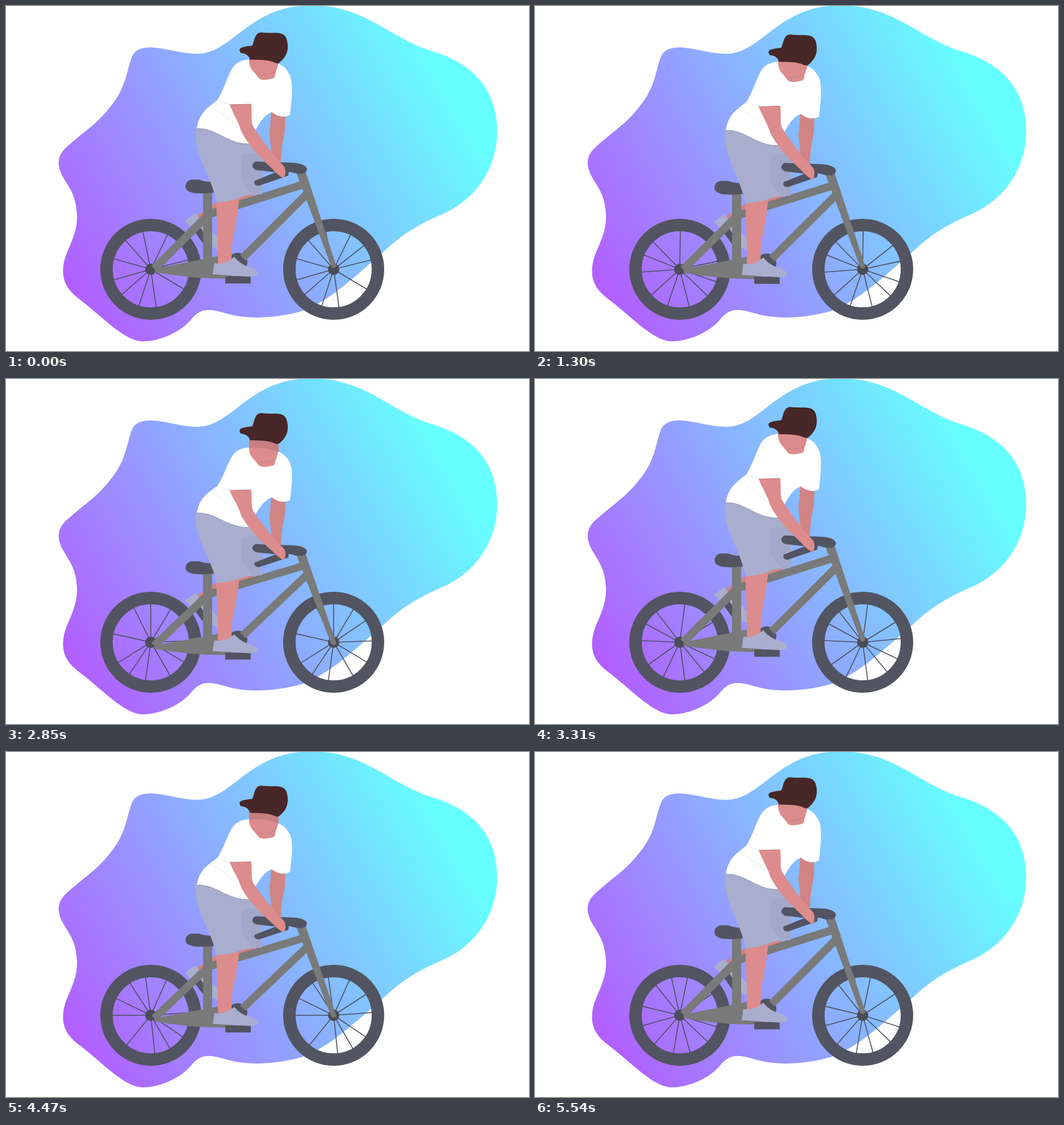
Write an HTML page that moves like this. It is 921 px wide and 608 px high and loops after 5620 ms.

```html
<!DOCTYPE html>
<html lang="en">
<head>
<meta charset="utf-8">
<title>Cyclist</title>
<style>
  html, body { margin: 0; width: 100%; height: 100%; overflow: hidden; background: #fefefe; }
  svg { display: block; width: 921px; height: 608px; }
  .dark { fill: #525461; }
  .metal { fill: #797a79; }
  .skin { fill: #dc8c8c; }
  .shade { fill: #d08483; }
  .cloth { fill: #a9aece; }
  .line { fill: none; stroke-linecap: round; }
  .tube { fill: none; stroke: #797a79; }
</style>
</head>
<body>
<svg viewBox="0 0 921 608">
  <defs>
    <linearGradient id="sky" gradientUnits="userSpaceOnUse" x1="130" y1="530" x2="790" y2="150">
      <stop offset="0" stop-color="#b25eff"/>
      <stop offset="1" stop-color="#66ffff"/>
    </linearGradient>
  </defs>

  <path fill="url(#sky)" d="M222 89C228 76 240 73 256 73C285 74 313 86 342 84C400 80 430 0 535 -1C630 -2 670 52 745 78C815 98 865 140 865 222C864 286 828 341 768 367C700 396 680 420 655 442C610 480 570 520 520 538C470 552 420 552 385 541C355 532 342 534 328 550C310 574 270 592 238 591C208 588 175 553 135 521C112 504 92 486 104 444C112 420 126 400 125 368C123 330 110 320 98 297C88 275 92 260 112 244C145 215 165 205 193 165C212 138 214 108 222 89Z"/>

  <g id="wheels"></g>

  <g id="body">
    <!-- far leg -->
    <path class="dark" d="M326 389L340 383L364 420L354 428Z"/>
    <path class="cloth" d="M315 379L333 365L374 409V430L362 423L338 383L325 389Z"/>
    <path class="shade" d="M337 369L366 349L437 329L434 338L372 361L342 378Z"/>

    <!-- frame -->
    <circle class="dark" cx="408" cy="452" r="17"/>
    <path class="metal" d="M262 463L372 441L412 452L396 480Q335 482 262 469Z"/>
    <path class="tube" stroke-width="14" d="M261 463L360 364M357 367L525 314M417 444L531 330"/>
    <path class="metal" d="M347 328H363V444L347 447ZM511 293L527 290L582 459Q577 464 573 460Z"/>
    <path class="dark" d="M326 306H340Q355 312 374 309L371 328Q345 332 328 329Q316 326 316 318Q317 308 326 306Z"/>

    <!-- near leg -->
    <path class="dark" d="M386 476H431V489H386Z"/>
    <path class="skin" d="M370 340L411 336C408 370 402 395 398 420L397 452Q385 458 373 454C374 420 372 390 370 340Z"/>
    <path class="cloth" d="M367 453Q385 457 402 442Q412 455 428 460Q444 465 444 472Q443 477 430 477Q395 475 364 473Z"/>
    <path class="cloth" d="M336 212C334 218 334 222 334 225C335 270 358 290 371 346Q395 345 411 338Q430 331 450 332L452 262L430 238Z"/>
    <path fill="#a2a8c9" d="M415 263Q425 258 452 260L450 331Q440 334 434 330Q412 312 414 285Z"/>

    <!-- bars and far arm -->
    <path class="shade" d="M467 185Q480 193 492 192C492 215 490 230 487 240C485 255 484 268 484 280L468 268C467 240 462 225 465 215Z"/>
    <path class="dark" d="M439 274L500 276C515 276 530 280 530 288C528 296 520 297 510 295L498 292L497 299L445 317Q435 316 438 308L475 293L440 289Q428 282 439 274Z"/>

    <!-- shirt -->
    <path fill="#fff" d="M430 94C412 95 404 101 397 112C388 130 380 155 372 166C352 181 340 190 336 216C370 214 388 244 429 243C437 222 450 193 468 187Q485 200 500 192C503 170 506 140 501 125C496 113 490 106 480 102Z"/>
    <path class="line" stroke="#8f94b5" d="M336 216C370 214 388 244 429 243"/>
    <path class="line" stroke="#e6e6ec" d="M359 177C382 188 396 205 408 214M373 166Q385 172 394 173"/>

    <!-- near arm -->
    <path class="skin" d="M394 174L432 173C434 190 430 205 437 215C450 235 470 262 490 283Q495 294 489 304Q477 297 469 287C445 265 425 243 414 220C410 205 400 190 394 174Z"/>
    <path class="line" stroke="#b87272" d="M394 174L431 173"/>

    <!-- face -->
    <path class="skin" d="M428 76H480V95C480 105 476 112 474 121Q474 127 469 128L458 130Q449 131 445 127L438 118C432 112 428 106 428 94Z"/>
    <path fill="#c77f80" d="M428 76H480V102Q474 101 468 98Q450 92 428 96Z"/>
    <path class="line" stroke="#cb7f80" d="M441 119Q460 126 475 114"/>
  </g>

  <path id="cap" fill="#482728" d="M411 78C413 71 428 72 434 70C438 60 438 47 450 47C470 50 488 43 494 58C499 74 496 88 483 99Q479 104 470 99C455 94 440 96 430 95C427 86 420 84 413 83Z"/>
</svg>

<script>
const LOOP = 5620, STEPS = 73, TURN = 1965;
const FLOOR_Y = 595;
const SPOKES = [0, 51, 77, 108, 133, 165, 198, 227, 265, 291, 315];
const SVG = "http://www.w3.org/2000/svg";
const $ = id => document.getElementById(id);

function add(parent, tag, attrs) {
  const el = parent.appendChild(document.createElementNS(SVG, tag));
  for (const key in attrs) el.setAttribute(key, attrs[key]);
  return el;
}

function makeWheel(x, y) {
  const wheel = add($("wheels"), "g", { transform: `translate(${x} ${y})` });
  add(wheel, "circle", { r: 78, fill: "none", stroke: "#525461", "stroke-width": 22 });
  const spokes = add(wheel, "g", { stroke: "#4d4f5b", "stroke-width": 1.6 });
  for (const a of SPOKES) add(spokes, "line", { x2: 68, transform: `rotate(${a})` });
  add(wheel, "circle", { r: 10, fill: "#4b4c57" });
  return spokes;
}

const wheels = [makeWheel(255, 464), makeWheel(577, 464)];

function draw(t) {
  const wave = Math.cos((t - 735) / TURN * 2 * Math.PI);
  const squash = 0.061 * ((1 + wave) / 2) ** 1.8 - 0.002;
  $("body").setAttribute("transform", `translate(0 ${FLOOR_Y * squash}) scale(1 ${1 - squash})`);
  $("cap").setAttribute("transform", `translate(0 ${5.5 + 8.5 * wave})`);
  for (const w of wheels) w.setAttribute("transform", `rotate(${31 + t / TURN * 360})`);
}

const start = performance.now();
function tick() {
  const t = (performance.now() - start) % LOOP;
  // Steps start on rounded times, up to 14 ms early.
  const step = Math.min(STEPS - 1, Math.floor((t + 14) / LOOP * STEPS));
  draw(step * LOOP / STEPS);
  requestAnimationFrame(tick);
}
tick();
</script>
</body>
</html>
```
